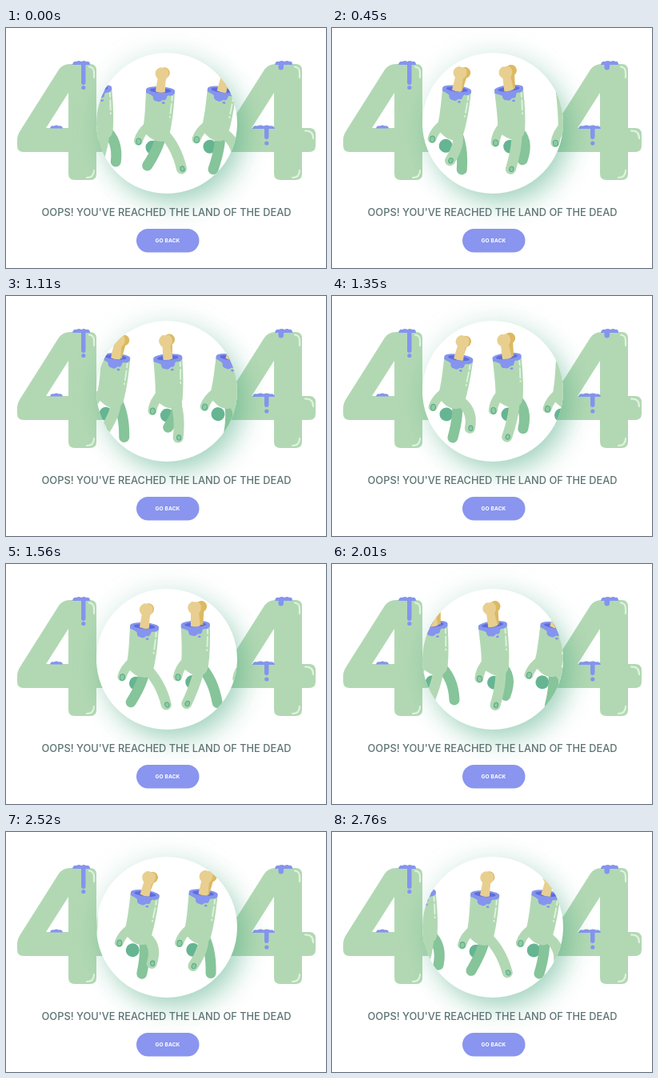
Animation, 400 px wide and 300 px high, one loop 2.79 s. Source, as an HTML page:

```html
<!DOCTYPE html>
<html lang="en">
<head>
<meta charset="utf-8">
<title>404</title>
<style>
  html, body { margin: 0; width: 100%; height: 100%; overflow: hidden; background: #fff; }
  svg { display: block; width: 400px; height: 300px; }
  text { font-family: Inter, "Open Sans", sans-serif; text-anchor: middle; }
  .skin { fill: #b2d8b3; }
  .goo { fill: #8594ee; }
  .shine { fill: none; stroke: #e0f3df; stroke-width: 2.2; stroke-linecap: round; }
  .limb { fill: none; stroke-linecap: round; stroke-linejoin: round; stroke-width: 13; }
  .light { stroke: #b2d8b3; }
  .dark { stroke: #86c49a; }
  .nail { fill: #8dcaa2; stroke: #58ad8b; stroke-width: 1.1; }
  .shadow { fill: #3fa57c; filter: url(#soft); }
</style>
</head>
<body>
<svg viewBox="0 0 400 300">
  <defs>
    <clipPath id="hole"><circle cx="201" cy="119" r="88"/></clipPath>
    <filter id="soft" x="-50%" y="-50%" width="200%" height="200%"><feGaussianBlur stdDeviation="17"/></filter>
    <g id="four">
      <path class="skin" fill-rule="evenodd" d="M80 45H105Q113 45 113 53V125H122Q130 125 130 133V147Q130 155 122 155H113V182Q113 190 105 190H86Q78 190 78 182V155H22Q14 155 14 147V140Q14 134 18 128L66 52Q71 45 80 45ZM78 81L50 125H78Z"/>
      <path class="shine" d="M104 48.500Q109.500 49 110 55V62M101 187Q110 187 110 178"/>
    </g>
  </defs>

  <use href="#four"/>
  <use href="#four" x="257"/>
  <path class="shine" d="M374 128.500Q384 128 384 138"/>

  <g class="goo">
    <path d="M83 46Q84 41 88 42Q91 40 94 42Q98 40 100 42Q105 41 105 46H99.500V68Q99.500 71 96.800 71Q94 71 94 68V46Z"/>
    <circle cx="96.800" cy="74.500" r="2.600"/>
    <path d="M55 125.500Q56 121 60 122.500Q63 120.500 66 122.500Q70 121.500 71 125.500Z"/>
    <path d="M336 46Q337 41 341 42Q345 40 348 42Q352 40 354 42Q358 41 358 46H347V49Q347 52.500 343.800 52.500Q340.500 52.500 340.500 49V46Z"/>
    <path d="M308 126Q309 121 314 122.500Q318 120.500 322 122.500Q326 120.500 330 122.500Q335 121.500 336 126H328.500V136Q328.500 139 325.800 139Q323 139 323 136V126Z"/>
    <circle cx="325.800" cy="144" r="2.600"/>
  </g>

  <circle class="shadow" cx="211" cy="134" r="84" opacity=".47"/>
  <circle class="shadow" cx="201" cy="117" r="90" opacity=".12"/>
  <circle cx="201" cy="119" r="88" fill="#fff"/>
  <g id="stage" clip-path="url(#hole)"></g>

  <text x="200.500" y="235.300" font-size="12.800" font-weight="500" fill="#5b7371">OOPS! YOU'VE REACHED THE LAND OF THE DEAD</text>
  <rect x="163" y="251" width="78.500" height="29.500" rx="14.750" fill="#8995ee"/>
  <text x="202" y="268.200" font-size="6.600" font-weight="700" letter-spacing=".1" fill="#fff">GO BACK</text>
</svg>

<script>
const LOOP = 2790, STEP = 30, STRIDE = LOOP / 2;
const LAP = 216, ENTRY = 119;

// wrist x at the start of the loop, and when the stride begins
const HANDS = [{ x: 122, lag: 827 }, { x: 194, lag: 1365 }, { x: 269, lag: 150 }];

const stage = document.getElementById("stage");
const mod = (v, n) => ((v % n) + n) % n;
const mix = (a, b, k) => a + (b - a) * k;
const wave = phase => Math.sin(2 * Math.PI * phase);

function build(hand, i) {
  stage.insertAdjacentHTML("beforeend", `
    <g id="hand${i}">
      <circle data-part="curl" cx="-6" cy="72" r="8.500" fill="#66b592"/>
      <path class="limb dark" data-part="back"/>
      <g data-part="arm">
        <path class="skin" d="M-18 1H18C18 22 17 40 14.500 54Q12 64 3 64Q-5 64 -11 59L-20 52C-17 40 -18 20 -18 1Z"/>
        <path class="limb light" style="stroke-width:11" d="M-12 45Q-22 54 -24 65"/>
        <ellipse class="nail" cx="-23.500" cy="65.500" rx="3" ry="3.800"/>
        <path class="shine" style="stroke-width:1.800" d="M15 7V12M14.800 16L14 28M13.700 32V33"/>
        <path class="goo" d="M-18 0H18V3Q15 7 10 6Q8 7 8 10Q7 13 3 12Q0 16 -4 14Q-9 14 -9 8Q-12 6 -18 4Z"/>
        <ellipse class="goo" cx="4.500" cy="15.500" rx="2" ry="1.400"/>
        <ellipse class="goo" rx="18" ry="4.600"/>
        <ellipse cy=".3" rx="13.500" ry="2.900" fill="#5e6ddb"/>
        <g data-part="bone">
          <g data-part="shade" fill="#dcb962">
            <circle cy="-22" r="7"/><path d="M-4 -20L3 -16L1 1H-6Z"/>
          </g>
          <path fill="#e8cf90" d="M-6 2L-5 -14Q-10 -18 -8 -24Q-4 -30 0 -28Q7 -29 8 -23Q9 -18 5 -14L6 2Q0 4 -6 2Z"/>
        </g>
      </g>
      <path class="limb light" data-part="front"/>
      <ellipse class="nail" data-part="nail" rx="2.600" ry="3.200"/>
    </g>
    <use href="#hand${i}" x="${-LAP}"/>`);
  hand.root = document.getElementById("hand" + i);
  hand.parts = {};
  hand.root.querySelectorAll("[data-part]").forEach(el => hand.parts[el.dataset.part] = el);
}

// Planted, the tip slides back under the wrist; then it lifts and swings ahead.
function step(phase, stance) {
  const p = mod(phase, 1);
  if (p < stance) {
    const k = p / stance;
    return { x: mix(28, -18, k), y: 98 + 2.5 * Math.sin(Math.PI * k), lift: 0 };
  }
  const k = (p - stance) / (1 - stance);
  const lift = Math.sin(Math.PI * k);
  return { x: mix(-18, 28, k * k * (3 - 2 * k)), y: 98 - 11 * lift, lift };
}

// Draws hip to tip through a knee that bends forward; returns the knee.
function finger(el, hip, tip) {
  const knee = { x: (hip.x + tip.x) / 2 + 3 + 4 * tip.lift, y: (hip.y + tip.y) / 2 - 3 };
  const cx = 2 * knee.x - (hip.x + tip.x) / 2, cy = 2 * knee.y - (hip.y + tip.y) / 2;
  el.setAttribute("d", `M${hip.x} ${hip.y}Q${cx} ${cy} ${tip.x} ${tip.y}`);
  return knee;
}

function pose({ x, lag, parts, root }, t) {
  const phase = mod(t - lag, STRIDE) / STRIDE;
  const along = x + LAP * t / LOOP - 3.5 - 4.5 * wave(phase - .12);
  const wristX = ENTRY + mod(along - ENTRY, LAP);
  const wristY = 76.6 + 1.2 * wave(phase + .25);
  const tilt = .8 - 7 * wave(phase - .08);
  const a = tilt * Math.PI / 180;
  const hip = { x: 4 * Math.cos(a) - 51 * Math.sin(a), y: 4 * Math.sin(a) + 51 * Math.cos(a) };
  const front = step(phase, .62), back = step(phase + .48, .44);
  const set = (name, value) => parts[name].setAttribute("transform", value);

  root.setAttribute("transform", `translate(${wristX} ${wristY})`);
  set("arm", `rotate(${tilt})`);
  set("curl", `rotate(${tilt})`);
  set("bone", `rotate(${tilt * .7})`);
  set("shade", `translate(${5.5 - 3 * wave(phase + .25)} 0)`);
  finger(parts.back, hip, back);
  const knee = finger(parts.front, hip, front);
  const turn = Math.atan2(knee.x - front.x, front.y - knee.y) * 180 / Math.PI;
  set("nail", `translate(${front.x + 1} ${front.y}) rotate(${turn})`);
}

HANDS.forEach(build);
const start = performance.now();

function tick() {
  const now = performance.now() - start;
  const t = Math.floor(now / STEP) * STEP % LOOP;
  HANDS.forEach(hand => pose(hand, t));
  requestAnimationFrame(tick);
}
tick();
</script>
</body>
</html>
```
